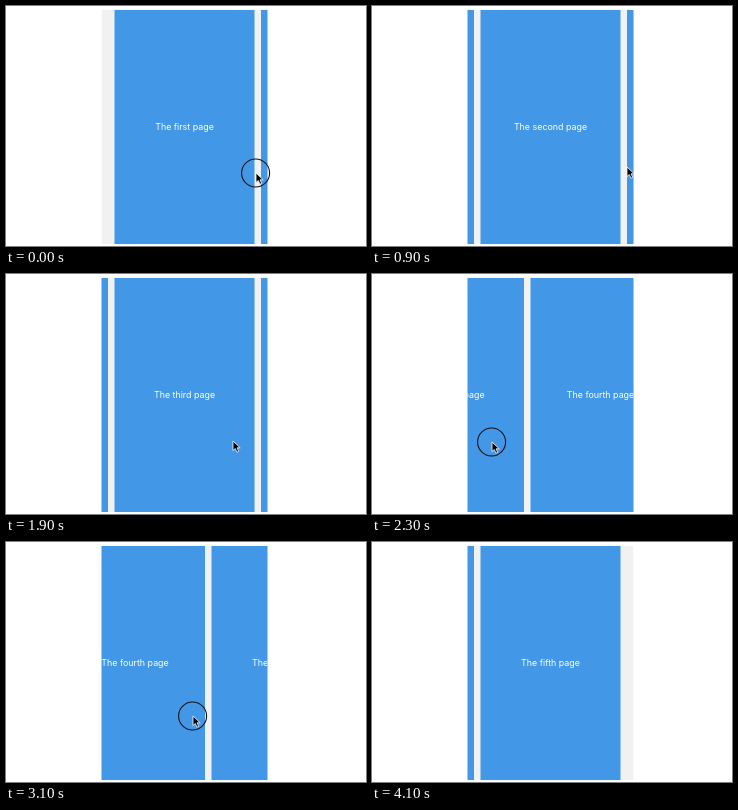
Recreate the animation shown at these times as an HTML page. Size 360 by 240 pixels, loop 4200 ms.

```html
<!DOCTYPE html>
<html lang="en">
<head>
<meta charset="utf-8">
<title>Page carousel</title>
<style>
  html, body { margin: 0; height: 100%; overflow: hidden; background: #fff; }
  svg { display: block; }
  text { font: 8.9px Inter, sans-serif; fill: #fff; text-anchor: middle; }
</style>
</head>
<body>
<svg width="360" height="240" viewBox="0 0 360 240">
  <svg x="95.5" y="3.75" width="166" height="234.5">
    <rect width="100%" height="100%" fill="#f1f1f1"/>
    <g id="pages"></g>
  </svg>
  <g id="cursor">
    <circle id="ring" cx="-.4" r="14" fill="none" stroke="#111" stroke-width="1.1"/>
    <path d="M0 0V9.6L2.3 7.5L3.9 11.2L5.7 10.4L4.1 6.8H7.2Z" stroke="#fff" stroke-width=".8"/>
  </g>
</svg>
<script>
const LOOP = 4200, STEP = 100, HIDE_CURSOR = 3700;
const PAGE = 140, PITCH = 146.5, SLOP = 10.5, SETTLE = 60, RETURN = 500;
const byId = id => document.getElementById(id);
const pages = byId('pages'), cursor = byId('cursor'), ring = byId('ring');

pages.innerHTML = ['first', 'second', 'third', 'fourth', 'fifth'].map((name, i) =>
  `<g transform="translate(${13 + i * PITCH})">
    <rect width="${PAGE}" height="100%" fill="#4297e7"/>
    <text x="${PAGE / 2}" y="120.25">The ${name} page</text>
  </g>`).join('');

const swipes = [
  { press: 0, release: 300, from: [250, 167], to: [148, 157] },
  { press: 1250, release: 1400, from: [255, 161], to: [150, 151] },
  { press: 2000, release: 2300, from: [227, 167], to: [120, 168] },
  { press: 2800, release: 3400, from: [247, 183], to: [127, 165] }
];

const clamp = u => Math.min(1, Math.max(0, u));
const smooth = u => u * u * (3 - 2 * u);
const mix = (a, b, k) => a.map((v, i) => v + (b[i] - v) * k);

function dragPoint(t, { press, release, from, to }) {
  return mix(from, to, smooth(clamp((t - press) / (release - press))));
}

// After each drag the pointer travels to the next starting point and rests
function pointerAt(t) {
  const next = swipes.findIndex(s => s.press > t);
  const current = swipes.at(next - 1 - (next < 0 ? -1 : 0));
  const target = swipes.at(Math.max(0, next)).from;
  return mix(dragPoint(t, current), target, clamp((t - current.release) / RETURN));
}

// A page follows the pointer past a small threshold, then settles exponentially
function swipeOffset(t, swipe) {
  const drag = Math.max(0, swipe.from[0] - dragPoint(t, swipe)[0] - SLOP);
  if (t <= swipe.release) return drag;
  return PITCH - (PITCH - drag) * Math.exp((swipe.release - t) / SETTLE);
}

function draw(now) {
  const t = Math.floor(now % LOOP / STEP) * STEP;
  const scroll = swipes.reduce((sum, swipe) => sum + swipeOffset(t, swipe), 0);
  const held = swipes.some(s => t >= s.press && t <= s.release);
  pages.setAttribute('transform', `translate(${-scroll})`);
  cursor.setAttribute('transform', `translate(${pointerAt(t)})`);
  cursor.style.display = t < HIDE_CURSOR ? '' : 'none';
  ring.style.display = held ? '' : 'none';
}

const start = performance.now();
function tick() {
  draw(performance.now() - start);
  requestAnimationFrame(tick);
}
tick();
</script>
</body>
</html>
```
